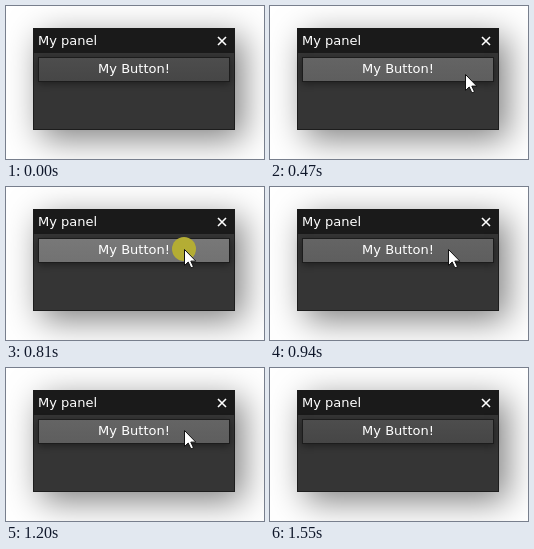
Write an HTML page that moves like this. It is 258 by 153 pixels and loops after 1.88 s.

```html
<!DOCTYPE html>
<html lang="en">
<meta charset="utf-8">
<title>Panel button</title>
<style>
  html, body { margin: 0; width: 100%; height: 100%; overflow: hidden; background: #fff; }
  div, svg { position: absolute; box-sizing: border-box; }
  #panel {
    left: 27px; top: 22px; width: 202px; height: 102px;
    background: #353535; border: 1px solid #1d1d1d;
    box-shadow: 8px 9px 32px rgba(0, 0, 0, .5);
  }
  #title { left: 27px; top: 22px; width: 202px; height: 25px; background: #1a1a1a; }
  #button {
    left: 32px; top: 51px; width: 192px; height: 25px;
    border: 1px solid #1c1c1c; box-shadow: 0 2px 7px rgba(0, 0, 0, .4);
  }
  svg { left: 0; top: 0; }
  text { font: 13px "DejaVu Sans", sans-serif; fill: #fff; }
</style>
<body>
<div id="panel"></div>
<div id="title"></div>
<div id="button"></div>
<svg width="258" height="153">
  <text x="32" y="39">My panel</text>
  <path d="M212 31l8 8m0-8l-8 8" stroke="#fff" stroke-width="1.6"/>
  <text x="128" y="67" text-anchor="middle">My Button!</text>
  <circle id="click" cx="178" cy="62" r="12" fill="#b4ad34"/>
  <path id="cursor" d="M.5.5v16l3.7-3.5 2.7 5.9 2.6-1.1-2.7-5.7h5z" fill="#fff" stroke="#111"/>
</svg>
<script>
  const LOOP = 1880;
  // Each pose holds until the next: [start ms, cursor x, cursor y]
  const poses = [
    [0], [330, 248, 91], [400, 222, 79], [470, 195, 68],
    [540, 178, 62], [1480, 200, 77], [1550]
  ];
  const [button, click, cursor] = ['button', 'click', 'cursor'].map(id => document.getElementById(id));
  const show = (el, on) => el.style.visibility = on ? 'visible' : 'hidden';
  const within = (t, from, to) => t >= from && t < to;

  function draw(now) {
    const t = now % LOOP;
    const [, x, y] = poses.findLast(pose => pose[0] <= t);
    const pressed = within(t, 810, 940) || within(t, 1070, 1200);
    const hovered = x !== undefined && x < 224 && y < 76 && y > 51;
    const [top, bottom] = pressed ? ['#787878', '#727272']
      : hovered ? ['#646464', '#5e5e5e'] : ['#4d4d4d', '#464646'];

    button.style.background = `linear-gradient(${top}, ${bottom})`;
    show(click, pressed);
    show(cursor, x !== undefined);
    if (x !== undefined) cursor.setAttribute('transform', `translate(${x} ${y})`);
  }

  const start = performance.now();
  function tick() {
    draw(performance.now() - start);
    requestAnimationFrame(tick);
  }
  tick();
</script>
</body>
</html>
```
